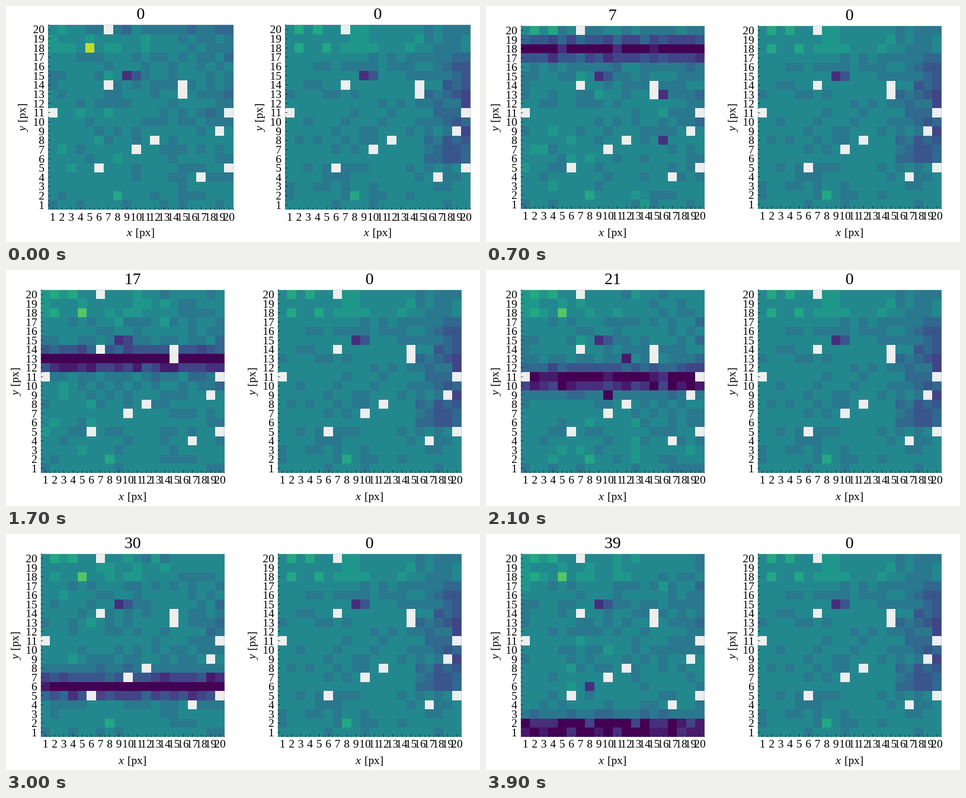
Recreate the animation shown at these times as an HTML page with a canvas. Size 800x400 px, loop 4000 ms.

```html
<!DOCTYPE html>
<html lang="en">
<head>
<meta charset="utf-8">
<title>Pixel maps</title>
<style>
  html, body { margin: 0; width: 100%; height: 100%; overflow: hidden; background: #fff; }
  canvas { display: block; }
</style>
</head>
<body>
<canvas id="stage" width="800" height="400"></canvas>
<script>
const ctx = document.getElementById('stage').getContext('2d');
const N = 20, STEP = 100, STEPS = 40;
const SERIF = '"Liberation Serif", "Times New Roman", serif';
const LABEL_SIZE = 19.44, TITLE_SIZE = 27.78;
const COLORS = ['#440154', '#481a6c', '#472f7d', '#414487', '#39568c', '#31688e', '#2a788e', '#23888e',
  '#1f988b', '#22a884', '#35b779', '#54c568', '#7ad151', '#a5db36', '#c2df23', '#fde725'];
const DEAD_COLOR = '#eeeeee';

// The first step uses a slightly larger layout than the rest.
const FIRST = { x: 71, y: 32, size: 313 };
const REST = { x: 58.8, y: 33.8, size: 310 };

const DEAD = [[7, 20], [7, 14], [15, 14], [15, 13], [1, 11], [20, 11],
  [19, 9], [12, 8], [10, 7], [6, 5], [20, 5], [17, 4]];
const isDead = (x, y) => DEAD.some(([dx, dy]) => dx === x && dy === y);

// Pixels that read clearly low or high: x, y, level.
const SPOTS = [[9, 15, 2], [10, 15, 4], [2, 20, 9], [4, 20, 9], [2, 18, 8.6], [5, 18, 9], [8, 2, 8.8]];
const HOT = { x: 5, y: 18 };

// Repeatable value in -1..1.
function noise(x, y, seed) {
  const v = Math.sin(x * 127.1 + y * 311.7 + seed * 74.7) * 43758.5453;
  return (v - Math.floor(v)) * 2 - 1;
}

// Even sensor response with a warm top and a darker right edge.
function response(x, y, seed, tilt, edge) {
  const spot = SPOTS.find(([sx, sy]) => sx === x && sy === y);
  if (spot) return spot[2];
  const inEdge = x > 15 && y > 5 && y < 18;
  const fall = tilt * Math.max(0, x - 6) + (inEdge ? edge * (x - 15) : 0);
  const warm = y > 17 && x < 16 ? 0.4 : 0;
  return 6.85 + warm - fall + (inEdge ? 0.6 + edge : 0.6) * noise(x, y, seed);
}

const referenceLevel = (x, y) => response(x, y, 8, 0.02, 0.5);

// A dark band sweeps down, over flicker and rare hits.
function liveLevel(x, y, step) {
  const distance = Math.abs(y - 18 + (step - 7) * 14 / 27);
  const depth = 8 * Math.exp(-Math.pow(distance / 1.1, 1.6));
  const glow = x === HOT.x && y === HOT.y ? 1.8 + 3.3 * Math.exp(-step) : 0;
  const hit = noise(x, y, step + 150) > 0.995 ? 5 : 0;
  return response(x, y, 3, 0.01, 0.12) + glow - hit
    + 0.3 * noise(x, y, step + 20) - depth * (1 + 0.3 * noise(x, y, step + 90));
}

function text(str, x, y, size, align = 'center', style = '') {
  ctx.font = `${style} ${size}px ${SERIF}`;
  ctx.textAlign = align;
  ctx.fillText(str, x, y);
}

function axisLabel(name, x, y, angle) {
  ctx.save();
  ctx.translate(x, y);
  ctx.rotate(angle);
  text(name, -23.5, 0, LABEL_SIZE, 'left', 'italic');
  text('[px]', 23.5, 0, LABEL_SIZE, 'right');
  ctx.restore();
}

function drawCells(left, top, cell, level) {
  for (let y = 1; y <= N; y++) {
    const y0 = Math.round(top + (N - y) * cell), y1 = Math.round(top + (N - y + 1) * cell);
    for (let x = 1; x <= N; x++) {
      const x0 = Math.round(left + (x - 1) * cell), x1 = Math.round(left + x * cell);
      const index = Math.max(0, Math.min(COLORS.length - 1, Math.round(level(x, y))));
      ctx.fillStyle = isDead(x, y) ? DEAD_COLOR : COLORS[index];
      ctx.fillRect(x0, y0, x1 - x0, y1 - y0);
    }
  }
}

function drawTicks(left, bottom, along, length) {
  ctx.fillRect(left + along - 0.35, bottom - length, 0.7, length);
  ctx.fillRect(left, bottom - along - 0.35, length, 0.7);
}

function drawPanel({ x, y: top, size }, offset, title, level) {
  const left = x + offset, cell = size / N;
  const bottom = top + size, middle = left + size / 2;
  drawCells(left, top, cell, level);

  ctx.strokeStyle = 'rgba(150,150,150,0.5)';
  ctx.lineWidth = 0.7;
  ctx.strokeRect(left, top, size, size);

  ctx.fillStyle = '#000';
  for (let i = 1; i <= N; i++) {
    const along = (i - 0.5) * cell;
    drawTicks(left, bottom, along, 4);
    drawTicks(left, bottom, along + cell / 2, 2);
    text(i, left + along, bottom + 18.5, LABEL_SIZE);
    text(i, left - 6, bottom - along + 6.6, LABEL_SIZE, 'right');
  }
  text(title, middle, top - 10, TITLE_SIZE);
  axisLabel('x', middle, 389.5, 0);
  axisLabel('y', left - 38, top + size / 2, -Math.PI / 2);
}

function draw(step) {
  const layout = step === 0 ? FIRST : REST;
  ctx.fillStyle = '#fff';
  ctx.fillRect(0, 0, 800, 400);
  drawPanel(layout, 0, step, (x, y) => liveLevel(x, y, step));
  drawPanel(layout, 400, 0, referenceLevel);
}

const start = performance.now();
let shown = -1;
function tick() {
  const step = Math.floor((performance.now() - start) / STEP) % STEPS;
  if (step !== shown) draw(shown = step);
  requestAnimationFrame(tick);
}
tick();
</script>
</body>
</html>
```
